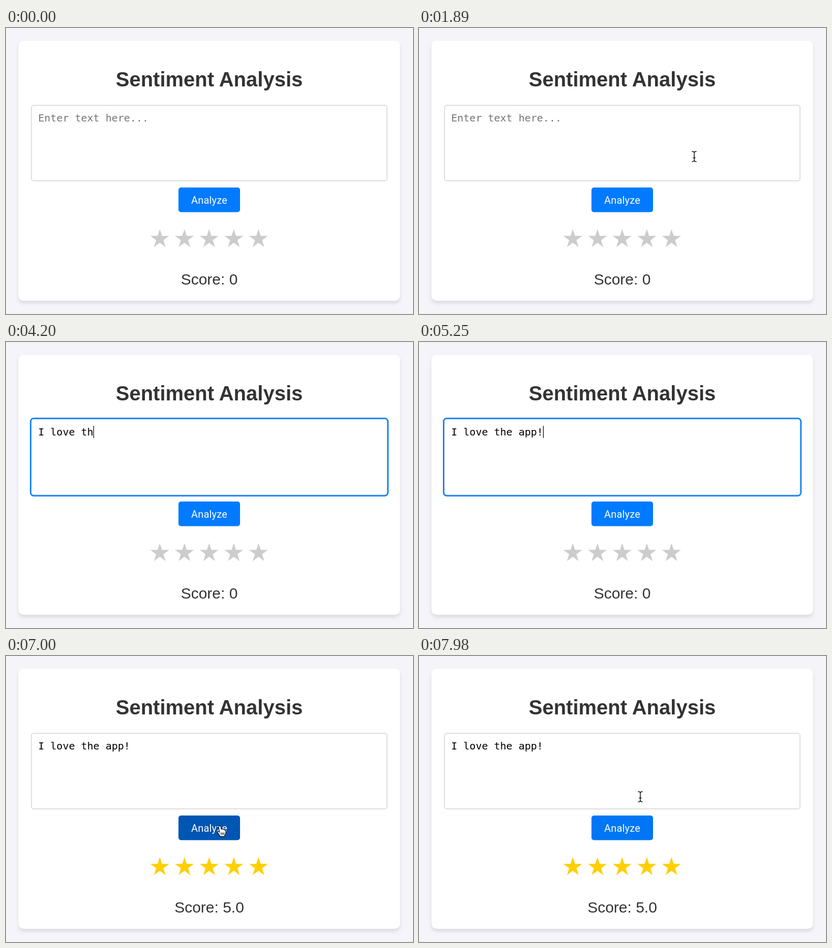
An HTML page that plays this animation: 800 by 563 pixels, repeating every 8000 ms.

```html
<!DOCTYPE html>
<html lang="en">
<head>
<meta charset="utf-8">
<title>Sentiment Analysis</title>
<style>
  html, body { margin: 0; width: 100%; height: 100%; overflow: hidden; background: #f4f4f9; }
  svg { display: block; width: 100%; height: 100%; }
  .card { fill: #fff; filter: drop-shadow(0 5px 3.75px rgba(0, 0, 0, .1)); }
  .sans { font-family: "Liberation Sans", Arial, sans-serif; fill: #333; text-anchor: middle; }
  .title { font-size: 40px; font-weight: bold; }
  .score { font-size: 30px; }
  .label { font: 20px Roboto, Inter, sans-serif; letter-spacing: .2px; fill: #fff; text-anchor: middle; }
  .mono { font: 20px "DejaVu Sans Mono", monospace; white-space: pre; }
  .line { fill: none; stroke-linecap: round; stroke-linejoin: round; }
</style>
</head>
<body>
<svg viewBox="0 0 800 563">
  <rect class="card" x="24.5" y="25" width="750" height="512" rx="10"/>
  <text class="sans title" x="399.5" y="114.5">Sentiment Analysis</text>

  <rect x="50.1" y="152.1" width="698.8" height="148.8" rx="4.4" fill="#fff" stroke="#ccc" stroke-width="1.25"/>
  <rect id="ring" x="48.25" y="150.25" width="702.5" height="152.5" rx="6.2" fill="none" stroke="#007bff" stroke-width="2.5"/>
  <text id="field" class="mono" x="63.25" y="184"></text>
  <rect id="caret" y="165" width="1.25" height="24"/>

  <rect id="button" x="339" y="314" width="121" height="48.5" rx="5"/>
  <text class="label" x="399.5" y="346">Analyze</text>

  <g id="stars"></g>
  <text id="score" class="sans score" x="399.5" y="504.5"></text>

  <g id="cursor">
    <g id="beam" class="line">
      <path id="beamShape" d="M-4 -10 Q0 -10 0 -7 Q0 -10 4 -10 M0 -7.5 V7.5 M-4 10 Q0 10 0 7 Q0 10 4 10 M-2 2.5 H2" stroke="#fff" stroke-width="3"/>
      <use href="#beamShape" style="stroke:#000"/>
      <path d="M-4 -10 Q0 -10 0 -7 Q0 -10 4 -10 M0 -7.5 V7.5 M-4 10 Q0 10 0 7 Q0 10 4 10 M-2 2.5 H2" stroke="#000" stroke-width="1.4"/>
    </g>
    <path id="arrow" d="M0 0 V16.5 L3.8 13 L6.4 19 L9 18 L6.5 12 H11.7 Z" stroke="#fff" stroke-width="1.2"/>
    <g id="hand" stroke="#000" stroke-width="1.2" stroke-linejoin="round">
      <path fill="#fff" d="M-2 1.5 Q0 -1 2 1.5 L3.2 7 Q5 5.5 6.5 7.5 Q8.5 6.3 9.5 8.5 Q12 8 12 11 V14 Q12 16 10 19 V21 H1 Q-1 17.5 -4.5 13.5 Q-5 11 -2.5 11.5 L-.5 13 Z"/>
      <path d="M2.8 13.5 V18 M5.6 13.5 V18 M8.4 13.5 V18"/>
    </g>
  </g>
</svg>
<script>
const LOOP = 8000, STEP = 70;
const MESSAGE = "I love the app!";
const KEY_TIMES = [2940, 3150, 3290, 3430, 3640, 3780, 3850, 3990, 4130, 4270, 4410, 4690, 4830, 4970, 5250];
const FOCUS = 2240, BLUR = 6510, RESULT = 6650;
const HOVER_IN = 6270, HOVER_OUT = 7805, FADE = 300;
const BLINK = 530, CHAR = 12.04, TEXT_X = 63.25;

// time, x, y of the pointer; it is hidden while typing
const ARRIVE = [[1470, 797, 404], [1540, 760, 382], [1610, 703, 346], [1680, 640, 308], [1750, 590, 280],
  [1820, 556, 260], [1890, 541, 253], [2170, 541, 253], [2240, 533, 247], [2940, 533, 247]];
const RETURN = [[5880, 533, 247], [6265, 448, 314], [6370, 421, 334], [6650, 421, 334], [6720, 420, 334],
  [7630, 420, 334], [7770, 426, 318], [7840, 431, 299], [7980, 435, 277], [LOOP, 435, 277]];

const el = id => document.getElementById(id);
const set = (node, name, value) => node.setAttribute(name, value);
const show = (node, on) => set(node, "visibility", on ? "visible" : "hidden");
const mix = (a, b, p) => a + (b - a) * p;
const clamp = p => Math.min(1, Math.max(0, p));

// the CSS "ease" curve
function ease(p) {
  const bez = (a, b, u) => 3 * a * u * (1 - u) ** 2 + 3 * b * u * u * (1 - u) + u ** 3;
  let lo = 0, hi = 1;
  for (let i = 0; i < 20; i++) {
    const mid = (lo + hi) / 2;
    if (bez(.25, .25, mid) < p) lo = mid; else hi = mid;
  }
  return bez(.1, 1, lo);
}

function starPath(cx, cy, r) {
  const points = Array.from({ length: 10 }, (_, i) => {
    const a = i * Math.PI / 5, d = i % 2 ? r * .382 : r;
    return (cx + d * Math.sin(a)).toFixed(2) + " " + (cy - d * Math.cos(a)).toFixed(2);
  });
  return "M" + points.join("L") + "Z";
}

for (let i = 0; i < 5; i++) {
  const star = document.createElementNS(el("stars").namespaceURI, "path");
  set(star, "d", starPath(302.3 + i * 48.5, 415.4, 19.5));
  el("stars").append(star);
}

function pointerAt(t) {
  for (const path of [ARRIVE, RETURN]) {
    const i = path.findIndex(key => key[0] > t);
    if (i < 1) continue;
    const [t0, x0, y0] = path[i - 1], [t1, x1, y1] = path[i];
    const p = (t - t0) / (t1 - t0);
    return { x: mix(x0, x1, p), y: mix(y0, y1, p) };
  }
  return null;
}

function drawPointer(t) {
  const at = pointerAt(t);
  let kind = "";
  if (at) {
    const { x, y } = at;
    set(el("cursor"), "transform", `translate(${x.toFixed(1)} ${y.toFixed(1)})`);
    if (x > 49 && x < 750 && y > 151 && y < 302) kind = "beam";
    else if (x > 339 && x < 460 && y >= 314 && y < 362) kind = "hand";
    else kind = "arrow";
  }
  for (const id of ["beam", "arrow", "hand"]) show(el(id), id === kind);
}

function drawField(t) {
  const count = KEY_TIMES.filter(k => k <= t).length;
  const field = el("field");
  field.textContent = count ? MESSAGE.slice(0, count) : "Enter text here...";
  set(field, "fill", count ? "#000" : "#757575");

  const focused = t >= FOCUS && t < BLUR;
  const since = t - (count ? KEY_TIMES[count - 1] : FOCUS);
  show(el("ring"), focused);
  show(el("caret"), focused && since % (2 * BLINK) < BLINK);
  set(el("caret"), "x", TEXT_X + count * CHAR);
}

function drawButton(t) {
  const p = ease(clamp((t - HOVER_IN) / FADE)) - ease(clamp((t - HOVER_OUT) / FADE));
  set(el("button"), "fill", `rgb(0,${Math.round(mix(123, 86, p))},${Math.round(mix(255, 179, p))})`);
}

function draw(time) {
  const t = Math.floor(time % LOOP / STEP) * STEP;
  const done = t >= RESULT;
  drawField(t);
  drawButton(t);
  drawPointer(t);
  set(el("stars"), "fill", done ? "#ffcf00" : "#ccc");
  el("score").textContent = done ? "Score: 5.0" : "Score: 0";
}

const start = performance.now();
function tick() {
  draw(performance.now() - start);
  requestAnimationFrame(tick);
}
tick();
</script>
</body>
</html>
```
